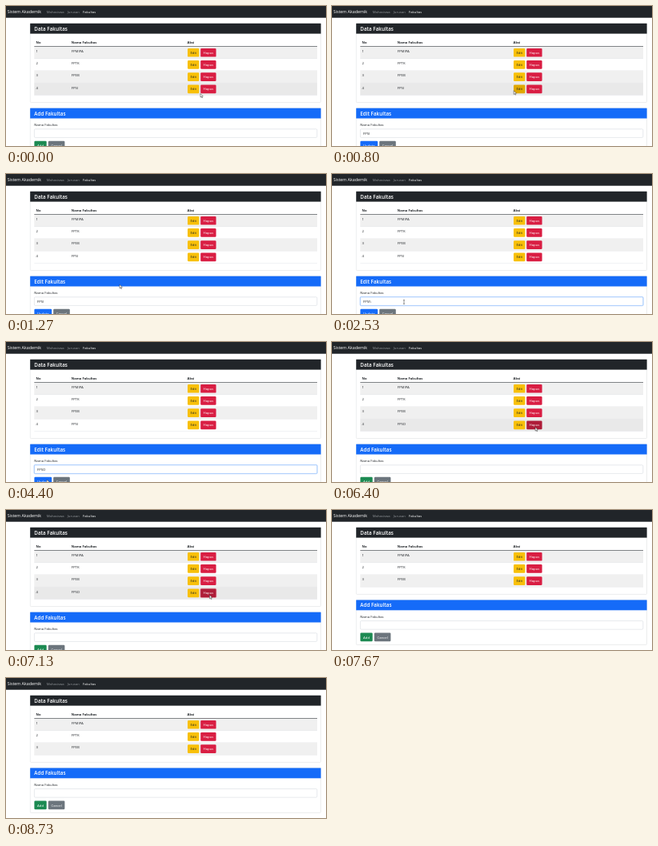
Recreate the animation shown at these times as an HTML page with a canvas. Size 400 by 175 pixels, loop 8.8 s.

```html
<!DOCTYPE html>
<html lang="id">
<head>
<meta charset="utf-8">
<title>Sistem Akademik</title>
<style>
html, body { margin: 0; width: 100%; height: 100%; overflow: hidden; background: #fff; }
canvas { display: block; width: 400px; height: 175px; }
</style>
</head>
<body>
<canvas id="stage"></canvas>
<script>
const LOOP = 8800, STEP = LOOP / 132, ROW = 15.2;
const FONT = '"Open Sans", "Noto Sans", sans-serif';
const canvas = document.getElementById('stage');
const ctx = canvas.getContext('2d');
const dpr = window.devicePixelRatio || 1;
canvas.width = 400 * dpr;
canvas.height = 175 * dpr;

const EDIT_AT = 530, FOCUS_AT = 1930, SAVE_AT = 4870, PRESS_AT = 6930, DELETE_AT = 7270;

// Pointer stops: time, x, y
const path = [
  [0, 243, 109.5], [400, 234, 105], [930, 226, 106], [1270, 142, 138.3],
  [1700, 92, 159], [2400, 90, 160], [3900, 90, 160], [4500, 48, 173],
  [5100, 48, 173], [5530, 206.5, 140.5], [6100, 252, 108],
  [6500, 254.5, 106.3], [7270, 254.5, 106.3], [7460, 250, 178]
];
const typing = [
  [EDIT_AT, 'FPSI'], [2400, 'FPSI\\'], [2930, 'FPSI'], [3200, 'FPS'],
  [3530, 'FPSD'], [SAVE_AT, '']
];

function pointerAt(t) {
  for (let i = 1; i < path.length; i++) {
    const [t1, x1, y1] = path[i];
    if (t > t1) continue;
    const [t0, x0, y0] = path[i - 1];
    const u = (t - t0) / (t1 - t0);
    const e = u * u * (3 - 2 * u);
    return { x: x0 + (x1 - x0) * e, y: y0 + (y1 - y0) * e };
  }
  return { x: -20, y: -20 };
}

function typedAt(t) {
  let value = '';
  for (const [at, s] of typing) if (t >= at) value = s;
  return value;
}

function box(x, y, w, h, fill) {
  ctx.fillStyle = fill;
  ctx.fillRect(x, y, w, h);
}

function round(x, y, w, h, r, fill, stroke, line = 0.5) {
  ctx.beginPath();
  ctx.roundRect(x, y, w, h, r);
  if (fill) { ctx.fillStyle = fill; ctx.fill(); }
  if (stroke) { ctx.strokeStyle = stroke; ctx.lineWidth = line; ctx.stroke(); }
}

function text(s, x, y, size = 4.25, color = '#212529', weight = 400, align = 'left') {
  ctx.font = `${weight} ${size}px ${FONT}`;
  ctx.fillStyle = color;
  ctx.textAlign = align;
  ctx.fillText(s, x, y);
}

function button(label, x, y, w, fill, color = '#fff') {
  round(x, y, w, 10.7, 1.2, fill);
  text(label, x + w / 2, y + 6.9, 4.3, color, 400, 'center');
}

function inside(p, x, y, w, h) {
  return p.x >= x && p.x <= x + w && p.y >= y && p.y <= y + h;
}

function card(title, y, h, color) {
  round(30.3, y, 363.2, h, 1, '#fff', '#d9dbdd');
  box(30.2, y, 363.4, 12.8, color);
  text(title, 35.3, y + 8.8, 6.3, '#fff', 600);
}

function navbar() {
  box(0, 0, 400, 14.7, '#212529');
  text('Sistem Akademik', 1.7, 9.4, 5.3, '#fff');
  text('Mahasiswa', 50.7, 9.1, 4.25, '#92969a');
  text('Jurusan', 76.7, 9.1, 4.25, '#92969a');
  text('Fakultas', 96, 9.1, 4.25, '#fff');
}

function table(t, p, names) {
  card('Data Fakultas', 21.8, 38 + names.length * ROW, '#212529');
  text('No', 37.5, 46.5, 4.2, '#212529', 700);
  text('Nama Fakultas', 81.8, 46.5, 4.2, '#212529', 700);
  text('Aksi', 226.5, 46.5, 4.2, '#212529', 700);
  names.forEach((name, i) => {
    const y = 50.6 + i * ROW;
    const hover = inside(p, 35.3, y, 353.7, ROW - 0.01);
    if (hover || i % 2 === 0) box(35.3, y, 353.7, ROW, hover ? '#e9e9e9' : '#f0f0f0');
    box(35.3, y + ROW - 0.3, 353.7, 0.4, '#dcdfe2');
    text(String(i + 1), 37.5, y + 7.4);
    text(name, 81.8, y + 7.4, 4.3);

    const by = y + 2.3;
    const onEdit = inside(p, 227, by, 14.4, 10.7);
    const onDelete = inside(p, 243.2, by, 19.4, 10.7);
    const pressed = i === 3 && t >= PRESS_AT;
    if (pressed) round(242.4, by - 0.8, 21, 12.3, 1.8, '#eba9b4');
    button('Edit', 227, by, 14.4, onEdit ? '#e0a800' : '#f8c008', '#212529');
    button('Hapus', 243.2, by, 19.4, onDelete || pressed ? '#ae1c38' : '#d91e43');
  });
  box(35.3, 50.1, 353.7, 0.6, '#30343a');
}

function form(t, editing, shift) {
  ctx.save();
  ctx.translate(0, -shift);
  card(editing ? 'Edit Fakultas' : 'Add Fakultas', 127.7, 56, '#156bf8');
  text('Nama Fakultas', 35.3, 150.2);
  const focus = editing ? Math.min(1, Math.max(0, (t - FOCUS_AT) / 150)) : 0;
  if (focus) {
    ctx.globalAlpha = focus;
    round(34.6, 153, 355, 12.2, 1.8, '#c5dcfd');
    ctx.globalAlpha = 1;
  }
  round(35.4, 153.8, 353.4, 10.6, 1.2, '#fff', focus ? '#76aefa' : '#ced4da');
  const value = typedAt(t);
  text(value, 39, 161, 4.3);
  if (editing) {
    button('Update', 35.4, 168.8, 21.8, '#156bf8');
    button('Cancel', 59.2, 168.8, 20.6, '#6c757d');
  } else {
    button('Add', 35.4, 168.8, 15.3, '#1c8a52');
    button('Cancel', 52.8, 168.8, 20.6, '#6c757d');
  }
  ctx.restore();
}

function pointer(p, beam) {
  ctx.save();
  ctx.translate(p.x, p.y);
  ctx.beginPath();
  if (beam) {
    ctx.moveTo(-0.9, -2.4); ctx.lineTo(0.9, -2.4);
    ctx.moveTo(0, -2.4); ctx.lineTo(0, 2.4);
    ctx.moveTo(-0.9, 2.4); ctx.lineTo(0.9, 2.4);
    ctx.strokeStyle = '#222';
    ctx.lineWidth = 0.5;
    ctx.stroke();
  } else {
    ctx.moveTo(0, 0);
    for (const [x, y] of [[0, 4.6], [1.1, 3.6], [1.9, 5.3], [2.6, 5], [1.8, 3.3], [3.3, 3.3]]) ctx.lineTo(x, y);
    ctx.closePath();
    ctx.fillStyle = '#fff';
    ctx.fill();
    ctx.strokeStyle = '#222';
    ctx.lineWidth = 0.45;
    ctx.stroke();
  }
  ctx.restore();
}

function draw(t) {
  ctx.setTransform(dpr, 0, 0, dpr, 0, 0);
  box(0, 0, 400, 175, '#fff');
  const p = pointerAt(t);
  const editing = t >= EDIT_AT && t < SAVE_AT;
  const names = ['FPMIPA', 'FPTK', 'FPEB'];
  if (t < DELETE_AT) names.push(t < SAVE_AT ? 'FPSI' : 'FPSD');
  table(t, p, names);
  form(t, editing, (4 - names.length) * ROW);
  navbar();
  const hidden = t >= 3200 && t < 3900;
  if (!hidden) pointer(p, inside(p, 35.3, 153.7, 353.7, 10.8));
}

const start = performance.now();
function tick() {
  const t = (performance.now() - start) % LOOP;
  draw(Math.floor((t + 4) / STEP) % 132 * STEP);
  requestAnimationFrame(tick);
}
tick();
</script>
</body>
</html>
```
